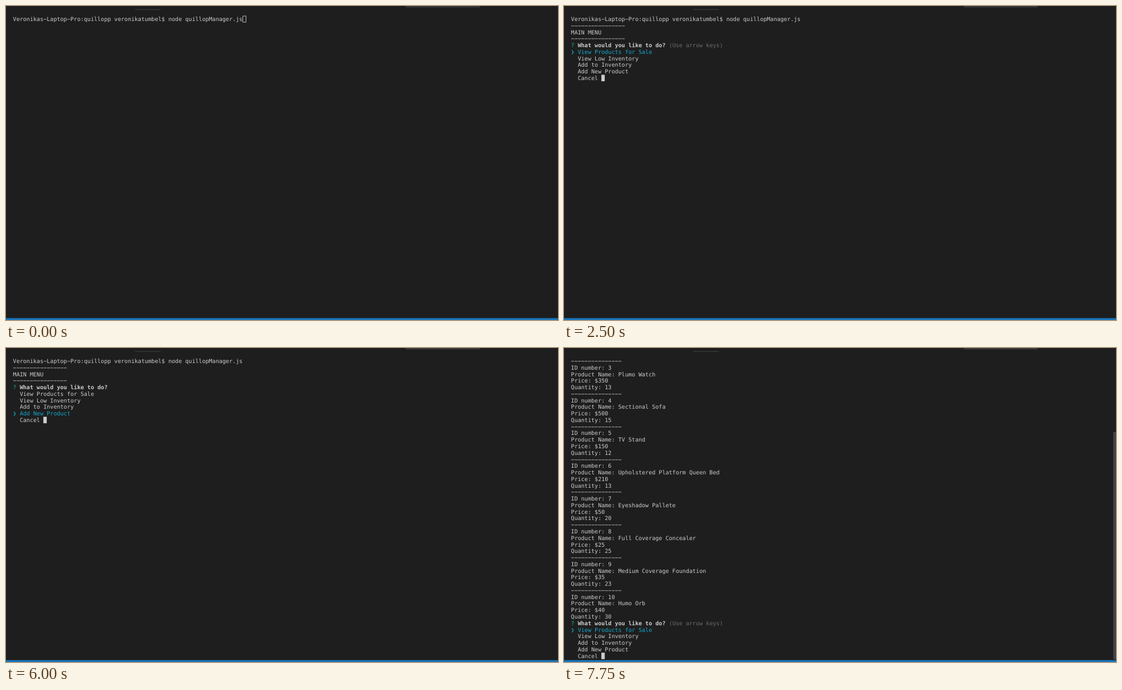
An HTML page that plays this animation: 992 px wide and 564 px high, repeating every 8 s.

```html
<!DOCTYPE html>
<html lang="en">
<head>
<meta charset="utf-8">
<title>Terminal menu</title>
<style>
  html, body { margin: 0; width: 100%; height: 100%; overflow: hidden; background: #1e1e1e; }
  svg { display: block; width: 992px; height: 564px; }
  text {
    font: 10.08px "DejaVu Sans Mono", "Liberation Mono", monospace;
    white-space: pre;
    text-rendering: geometricPrecision;
    fill: #ccc;
  }
  .bold { font-weight: bold; }
  .green { fill: #0dbc79; }
  .cyan { fill: #11a8cd; }
  .dim { fill: #6c6c6c; }
</style>
</head>
<body>
<svg id="stage" viewBox="0 0 992 564">
  <rect width="992" height="564" fill="#1e1e1e"/>
  <rect x="232" y="5.8" width="46" height="1" fill="#444"/>
  <rect x="718" y="-6" width="134" height="8.6" rx="3" fill="#3a3a3b"/>
  <rect y="560.6" width="992" height="3.4" fill="#1a75bb"/>
</svg>
<script>
const LOOP = 8000, LEFT = 12.6, TOP = 17.6, COL = 6.07, ROW = 11.77;
const stage = document.getElementById("stage");
const scenes = [];

function add(parent, tag, attrs) {
  const el = document.createElementNS("http://www.w3.org/2000/svg", tag);
  for (const key in attrs) el.setAttribute(key, attrs[key]);
  return parent.appendChild(el);
}

// A group that is visible from one time until another.
function scene(from, to) {
  const g = add(stage, "g", {});
  scenes.push({ g, from, to });
  return g;
}

function write(g, row, col, str, style = "") {
  const el = add(g, "text", { x: LEFT + col * COL, y: TOP + row * ROW + 9.4, class: style });
  el.textContent = str.replace(/-/g, "\u2212");
}

function block(g, row, col) {
  add(g, "rect", { x: LEFT + col * COL - 0.1, y: TOP + row * ROW, width: 6.1, height: 11.6, fill: "#ccc" });
}

const options = ["View Products for Sale", "View Low Inventory", "Add to Inventory", "Add New Product", "Cancel"];

function menu(g, row, selected, hint) {
  write(g, row, 0, "?", "green");
  write(g, row, 2, "What would you like to do?", "bold");
  if (hint) write(g, row, 29, "(Use arrow keys)", "dim");
  options.forEach((label, i) => {
    const active = i === selected;
    if (active) write(g, row + 1 + i, 0, "\u276f", "cyan");
    write(g, row + 1 + i, 2, label, active ? "cyan" : "");
  });
  block(g, row + 5, 9);
}

function pointer(from, to, x, y) {
  add(scene(from, to), "path", {
    d: "M0 0V12L2.8 9.5L4.8 14L6.8 13.1L4.9 8.8H9Z",
    transform: `translate(${x} ${y})`,
    fill: "#000", stroke: "#fff", "stroke-width": 0.9, "stroke-linejoin": "round"
  });
}

// Command line
write(scene(0, 7750), 0, 0, "Veronikas-Laptop-Pro:quillopp veronikatumbel$ node quillopManager.js");
add(scene(0, 750), "rect", { x: 425.6, y: 18, width: 5.6, height: 11, fill: "none", stroke: "#ccc", "stroke-width": 0.9 });
block(scene(750, 1750), 0, 68);
pointer(250, 500, 482.5, 68);
pointer(500, 1000, 477.5, 61.5);

// Main menu
const head = scene(2500, 7750);
["-".repeat(16), "MAIN MENU", "-".repeat(16)].forEach((line, i) => write(head, i + 1, 0, line));

const steps = [[2500, 0], [4000, 1], [4750, 2], [6000, 3], [6250, 0], [7750]];
steps.slice(0, -1).forEach(([at, selected], i) => menu(scene(at, steps[i + 1][0]), 4, selected, i === 0));

// Product list
const products = [
  ["Plumo Watch", 350, 13],
  ["Sectional Sofa", 500, 15],
  ["TV Stand", 150, 12],
  ["Upholstered Platform Queen Bed", 210, 13],
  ["Eyeshadow Pallete", 50, 20],
  ["Full Coverage Concealer", 25, 25],
  ["Medium Coverage Foundation", 35, 23],
  ["Humo Orb", 40, 30]
];
const list = scene(7750, LOOP);
products.forEach(([name, price, count], i) => {
  const lines = ["-".repeat(15), `ID number: ${i + 3}`, `Product Name: ${name}`, `Price: $${price}`, `Quantity: ${count}`];
  lines.forEach((line, j) => write(list, i * 5 + j, 0, line));
});
menu(list, 40, 0, true);
add(list, "rect", { x: 987, y: 151, width: 5, height: 408, fill: "#434343" });

function draw() {
  const t = performance.now() % LOOP;
  for (const { g, from, to } of scenes) g.style.display = t >= from && t < to ? "" : "none";
  requestAnimationFrame(draw);
}
draw();
</script>
</body>
</html>
```
